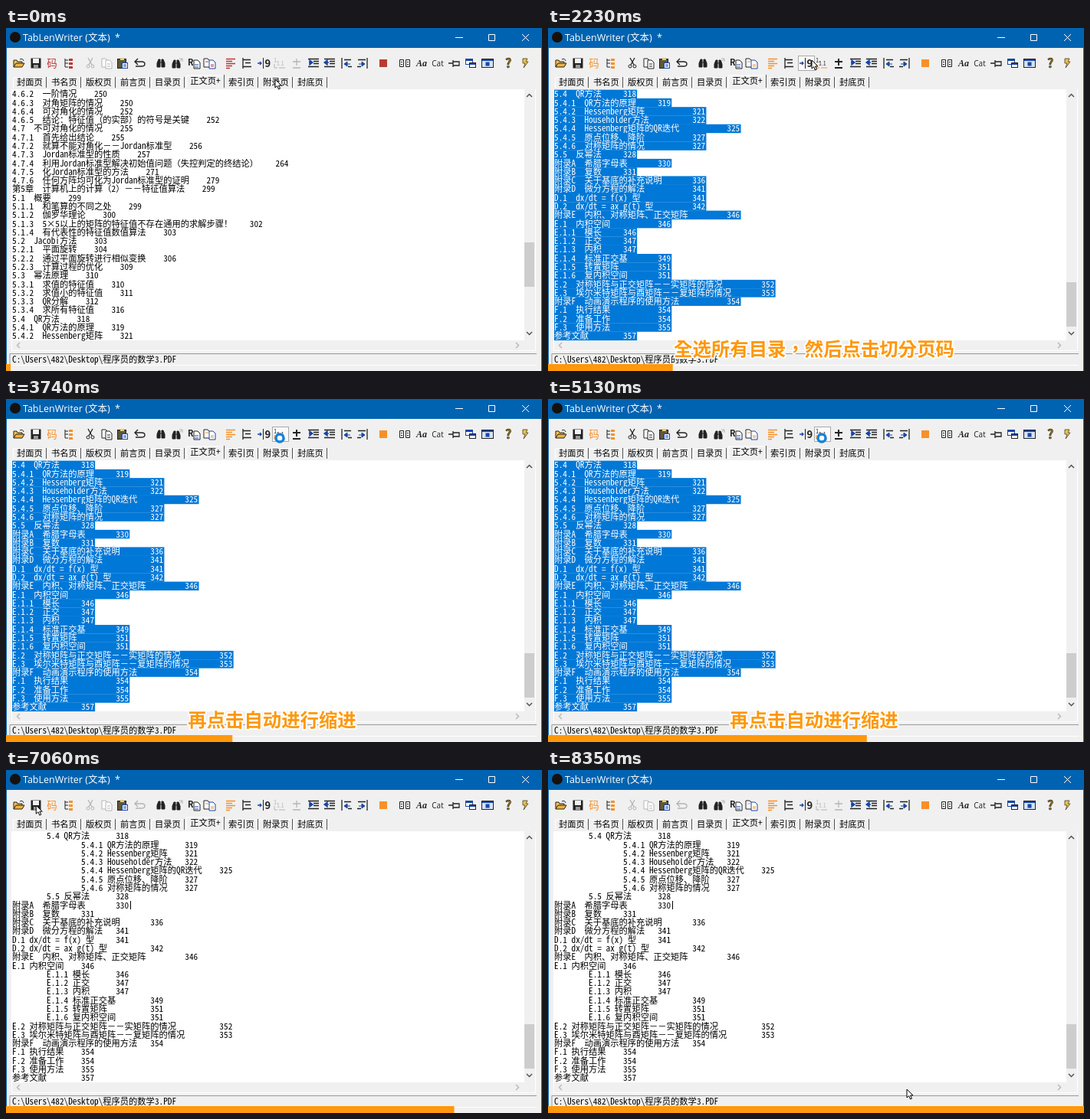
An HTML page that plays this animation: 699 by 448 pixels, repeating every 8420 ms.

```html
<!DOCTYPE html>
<html lang="zh-CN">
<head>
<meta charset="utf-8">
<style>
html, body { margin: 0; width: 100%; height: 100%; overflow: hidden; background: #f0f0f0; }
svg { display: block; }
text { white-space: pre; font-family: "Noto Sans CJK SC", sans-serif; }
.mono { font-family: "Noto Sans Mono CJK SC", "Noto Sans CJK SC", monospace; font-size: 11.28px; }
.ui { font-family: "Open Sans", "Noto Sans CJK SC", sans-serif; }
.cap { font: 700 24.4px "Noto Sans CJK TC", "Noto Sans CJK SC", sans-serif; fill: #ff980c;
  stroke: #fff; stroke-width: 4px; stroke-linejoin: round; paint-order: stroke; text-anchor: middle; }
</style>
</head>
<body>
<svg id="stage" width="699" height="448" viewBox="0 0 699 448"></svg>
<script>
const LOOP = 8420, COL = 5.64, ROW = 11.285, TOP = 80.6;
const SELECT = 1000, SPLIT = 1900, NEXT = 2800, BUSY = 3500, INDENT = 5800,
  DESELECT = 6600, DIALOG = 7200, CLOSE = 8000;
const APP = 'TabLenWriter', BLUE = '#0063b1', INK = '#222', GREY = '#b4b4b4';

// Each entry: number|title|page
const parse = s => s.trim().split('\n').map(l => l.split('|'));
const middle = parse(`
4.6.2|一阶情况|250
4.6.3|对角矩阵的情况|250
4.6.4|可对角化的情况|252
4.6.5|结论：特征值（的实部）的符号是关键|252
4.7|不可对角化的情况|255
4.7.1|首先给出结论|255
4.7.2|就算不能对角化－－Jordan标准型|256
4.7.3|Jordan标准型的性质|257
4.7.4|利用Jordan标准型解决初始值问题（失控判定的终结论）|264
4.7.5|化Jordan标准型的方法|271
4.7.6|任何方阵均可化为Jordan标准型的证明|279
第5章|计算机上的计算（2）－－特征值算法|299
5.1|概要|299
5.1.1|和笔算的不同之处|299
5.1.2|伽罗华理论|300
5.1.3|5×5以上的矩阵的特征值不存在通用的求解步骤！|302
5.1.4|有代表性的特征值数值算法|303
5.2|Jacobi方法|303
5.2.1|平面旋转|304
5.2.2|通过平面旋转进行相似变换|306
5.2.3|计算过程的优化|309
5.3|幂法原理|310
5.3.1|求值的特征值|310
5.3.2|求值小的特征值|311
5.3.3|QR分解|312
5.3.4|求所有特征值|316
5.4|QR方法|318
5.4.1|QR方法的原理|319
5.4.2|Hessenberg矩阵|321`);
const ending = parse(`
5.4|QR方法|318
5.4.1|QR方法的原理|319
5.4.2|Hessenberg矩阵|321
5.4.3|Householder方法|322
5.4.4|Hessenberg矩阵的QR迭代|325
5.4.5|原点位移、降阶|327
5.4.6|对称矩阵的情况|327
5.5|反幂法|328
附录A|希腊字母表|330
附录B|复数|331
附录C|关于基底的补充说明|336
附录D|微分方程的解法|341
D.1|dx/dt = f(x) 型|341
D.2|dx/dt = ax g(t) 型|342
附录E|内积、对称矩阵、正交矩阵|346
E.1|内积空间|346
E.1.1|模长|346
E.1.2|正交|347
E.1.3|内积|347
E.1.4|标准正交基|349
E.1.5|转置矩阵|351
E.1.6|复内积空间|351
E.2|对称矩阵与正交矩阵－－实矩阵的情况|352
E.3|埃尔米特矩阵与酉矩阵－－复矩阵的情况|353
附录F|动画演示程序的使用方法|354
F.1|执行结果|354
F.2|准备工作|354
F.3|使用方法|355
|参考文献|357`);

const cols = s => [...s].reduce((n, c) => n + (c > '~' ? 2 : 1), 0);
const tab = s => s + ' '.repeat(8 - cols(s) % 8);
const head = (n, title, sep) => (n ? n + sep : '') + title;
const plain = ([n, title, page]) => head(n, title, '  ') + '    ' + page;
const split = ([n, title, page]) => tab(head(n, title, '  ') + '    ') + page;
const indent = ([n, title, page]) => {
  const dots = n.split('.').length - 1;
  const level = /^[A-Z]/.test(n) ? dots - 1 : dots;
  return tab(' '.repeat(8 * level) + head(n, title, dots ? ' ' : '  ') + '  ') + page;
};

const rect = (x, y, w, h, fill, stroke = 'none') =>
  `<rect x="${x}" y="${y}" width="${w}" height="${h}" fill="${fill}" stroke="${stroke}"/>`;
const path = (d, stroke, w = 1, fill = 'none') =>
  `<path d="${d}" stroke="${stroke}" stroke-width="${w}" fill="${fill}"/>`;
const text = (x, y, s, size, fill = '#000', extra = '') =>
  `<text x="${x}" y="${y}" font-size="${size}" fill="${fill}" ${extra}>${s}</text>`;
const mid = 'text-anchor="middle"';
const at = (x, y, s) => `<g transform="translate(${x} ${y})">${s}</g>`;

function titleBar(dialog, dirty) {
  const fg = dialog ? '#777' : '#fff';
  return rect(0, 0, 699, 26, dialog ? '#fff' : BLUE) +
    path('M.5 26V448M698.5 26V448', dialog ? '#aaa' : BLUE) +
    '<circle cx="12" cy="12" r="7" fill="#15110f"/>' +
    text(22, 17, `${APP} (文本)${dirty ? '  *' : ''}`, 12.5, fg, 'class="ui"') +
    path('M586 12.5h10M629.5 8.5h8v8h-8zM673 8l9 9m0-9l-9 9', fg);
}

const binoculars = c => path('M-5 5V0l2-5h2v10zM5 5V0l-2-5h-2v10zM-1-1h2', c, 1, c);
const page = (x, c) => path(`M${x} -6h5l3 3v8h-8z`, c, 1, '#fff');
const shift = (dir, c) => path('M-7-5.5H7M0-2.5h7M0 .5h7M-7 4.5H7', INK, 1.5) +
  path(`M${dir < 0 ? -7 : -1}-1l${-dir * 4}-3v6zM-6-1h5`, c, 1.4, c);

function toolbar(selected, undo, hot) {
  const edit = selected ? INK : GREY, blue = '#1747a8';
  const icons = [
    [17, path('M-7 5V-4h4l1 2h6v2', INK, 1, '#f6c35a') + path('M-7 5l3-5H7L4 5z', INK, 1, '#eeb23e') + path('M1-5q4-2 5 2', INK)],
    [39, rect(-6.5, -6.5, 13, 13, '#222') + rect(-4, -6, 8, 6, '#f0f0f0') + rect(-3, 2, 6, 4, '#999')],
    [60, text(0, 5, '码', 13.5, hot, mid)],
    [82, path('M-5-6V5h4M-5 0h4M-5-4h4', INK) + rect(0, -6, 5, 3, hot) + rect(0, -1, 5, 3, hot) + rect(0, 4, 5, 3, hot)],
    [110, path('M-3-7L2 2M3-7L-2 2', edit, 1.3) + `<circle cx="-3" cy="4" r="2" fill="none" stroke="${edit}"/><circle cx="3" cy="4" r="2" fill="none" stroke="${edit}"/>`],
    [131, page(-6, edit) + at(5, 2, page(-6, edit)) + path('M1 1h4M1 4h4', edit)],
    [152, rect(-6.5, -5.5, 11, 12, '#5f563c', INK) + rect(-3, -7, 5, 3, '#e6cf72') + rect(-.5, -.5, 7, 7, '#fff', blue) + path('M1 2h4M1 4h4', blue)],
    [174, path('M-6-2h9q4 0 4 3t-4 3h-8M-2-6l-4 4l4 4', undo ? INK : GREY, 1.4)],
    [202, binoculars(INK)],
    [223, at(-1, 1, binoculars(INK)) + path('M3-6h4v4M7-6l-4 4', GREY)],
    [244, text(-7, 3, 'R', 11, INK, 'font-weight="700"') + at(2, 2, page(-1, INK)) + path('M2 2h5M2 5h5', blue)],
    [265, page(-7, INK) + at(5, 2, page(-5, blue)) + path('M-5-2h4M2 2h4M2 4h4', hot)],
    [293, path('M-6-5.5H6M-6-2.5H2M-6 .5H6M-6 3.5H2M-6 6.5H-1', hot, 1.6)],
    [314, path('M-5-7V7M-5-4.5H5M-2-.5H5M-5 4.5H6', INK, 1.3)],
    [336, path('M-8 0h5M-5-2l2 2l-2 2', blue, 1.3) + path('M-.5-7V7', INK) + text(1.5, 5, '9', 13, INK, 'font-weight="700"')],
    [357, text(-8, -1, '1.', 7.5, edit) + text(-4, 3, '1.1', 7, edit) + path('M-1 6H7M-7 1v5h4', selected ? hot : GREY)],
    [379, path('M-5-2H5M0-6V3M-5 6H5', edit, selected ? 2 : 1.3)],
    [401, shift(1, blue)],
    [422, shift(-1, blue)],
    [444, path('M-6-7V7M-3-4.5H6M2 4.5H7', INK, 1.3) + path('M-2 1H5M1-2l-4 3l4 3z', blue, 1, blue)],
    [465, path('M6-7V7M-6-4.5H4M-7 4.5H-2', INK, 1.3) + path('M-5 1H2M-1-2l4 3l-4 3z', blue, 1, blue)],
    [492, rect(-5, -5, 10, 10, hot)],
    [520, path('M-6.5-4.5h5v9h-5zM1.5-4.5h5v9h-5zM-5-1.5h2M-5 1.5h2M3-1.5h2M3 1.5h2', INK)],
    [542, text(0, 4, 'Aa', 12, INK, mid + ' style="font:italic 700 12px Liberation Serif,serif"')],
    [563, text(0, 4, 'Cat', 10, INK, mid + ' class="ui"')],
    [585, path('M-8 0h6M-2-4V5M-2-2H6V3H-2', INK, 1.3)],
    [606, rect(-6.5, -5.5, 9, 7, '#fff', blue) + rect(-6, -5, 8, 2, blue) + rect(-1.5, -.5, 8, 6, '#fff', INK) + rect(-1, 0, 7, 2, blue)],
    [628, rect(-7.5, -5.5, 15, 11, '#d6e2f5', INK) + rect(-7, -5, 14, 2, blue) + rect(-2.5, -1.5, 5, 5, blue)],
    [655, text(0, 6, '?', 16, '#9b7610', mid + ' font-weight="700" stroke="#222" stroke-width=".6"')],
    [677, path('M-3-6h6l-2 4h3l-6 8l2-6h-3z', '#665a30', 1, '#efc44c')]
  ];
  return icons.map(([x, s]) => at(x, 46, s)).join('');
}

function tabs() {
  const names = ['封面页', '书名页', '版权页', '前言页', '目录页', '正文页+', '索引页', '附录页', '封底页'];
  const centers = [31, 76, 121, 166, 211, 260, 307, 352, 397];
  return names.map((s, i) => {
    const on = i === 5, half = on ? 25 : 22, x = centers[i];
    return path(`M${x - half + .5} 78V${on ? 62 : 65}h${2 * half - 2}`, '#fff') +
      path(`M${x + half - .5} 78V${on ? 61 : 64}`, '#555') +
      text(x, on ? 73 : 75, s, 11.28, '#000', mid + ' class="mono"');
  }).join('');
}

function frame(thumb) {
  return rect(7, 80, 684, 342, '#fff') +
    rect(676, 80, 14, 341, '#f0f0f0') + rect(8, 408, 682, 13, '#f0f0f0') +
    rect(676, thumb, 13, 58, '#cdcdcd') +
    path('M679 90l3.5-3.5l3.5 3.5M679 397l3.5 3.5l3.5-3.5', '#555', 1.5) +
    path('M18 411l-3.5 3.5l3.5 3.5M665 411l3.5 3.5l-3.5 3.5', '#bbb', 1.5) +
    path('M5 440V425.5H692', '#999') + path('M5 440.5H692', '#fff') +
    text(8, 437, 'C:\\Users\\482\\Desktop\\程序员的数学3.PDF', 11.28, '#000', 'class="mono"');
}

const lines = (list, selected) => list.map((s, i) => {
  const y = TOP + i * ROW;
  return (selected ? rect(8, y, cols(s) * COL + 1, ROW + .2, '#0078d7') : '') +
    text(8, y + 9.7, s, 11.28, selected ? '#fff' : '#000', 'class="mono"');
}).join('');

function dialogBox() {
  return rect(239, 151, 227, 157, '#0002') + rect(235.5, 147.5, 227, 157, '#fff', BLUE) +
    rect(235, 147, 228, 26, BLUE) +
    text(239, 165, `${APP} (PDF书签编辑工具)`, 12.2, '#fff', 'class="ui"') +
    path('M441 157l8 8m0-8l-8 8', '#fff') +
    path('M278 204L295 233H261z', '#d08b18', 3, '#ffbf35') +
    path('M278 213v10', '#222', 4) + '<circle cx="278" cy="228" r="2.3" fill="#222"/>' +
    text(297, 217.5, '存储完毕。', 10, '#000') +
    rect(359, 266, 82, 26, '#fff') + path('M359.5 292V266.5H441', '#aaa') +
    path('M359 291.5H440.5V266', '#333', 2) +
    text(400, 283, '确定', 10.5, '#000', mid);
}

const track = [
  [0, 351, 67], [1000, 351, 67], [1700, 344, 42], [2900, 344, 42], [3400, 357, 51],
  [5800, 357, 51], [6250, 302, 178], [6450, 302, 178], [6580, 162, 176], [6700, 162, 176],
  [7050, 39, 46], [7750, 400, 279], [8000, 400, 279], [8250, 468, 417], [LOOP, 468, 417]
];
function cursor(t) {
  if (t > DIALOG && t < 7750) return '';
  const i = track.findIndex(k => k[0] > t);
  const [t0, x0, y0] = track[i - 1], [t1, x1, y1] = track[i];
  const u = (t - t0) / (t1 - t0), e = u * u * (3 - 2 * u);
  const x = x0 + (x1 - x0) * e, y = y0 + (y1 - y0) * e;
  if (t >= BUSY && t < INDENT)
    return `<circle cx="${x}" cy="${y}" r="5" fill="#fff" stroke="#1683d8" stroke-width="3.5"/>`;
  const overText = y > 80 && y < 407 && x > 8 && x < 676 && t < DIALOG;
  return at(x, y, overText
    ? path('M-3-5.5h2.5h3M-3 5.5h2.5h3M0-5V5', '#222')
    : path('M0 0V11L2.7 8.6L4.6 13L6.5 12L4.6 8H8z', '#000', 1, '#fff'));
}

function draw(t) {
  const dialog = t >= DIALOG && t < CLOSE;
  const selected = t >= SELECT && t < DESELECT;
  const list = t < SELECT ? middle.map(plain)
    : ending.map(t < SPLIT ? plain : t < INDENT ? split : indent);
  const caption = t < 700 ? '' : t < NEXT ? '全选所有目录，然后点击切分页码'
    : t < 6900 ? '再点击自动进行缩进' : '';
  const step = t < 500 ? 0 : 1 + Math.floor((t - 500) / 68.94 + .15);
  const pressed = t > 1700 && t < NEXT ? 326 : t > 3400 && t < INDENT ? 347 : 0;
  return rect(0, 0, 699, 448, '#f0f0f0') + titleBar(dialog, t < CLOSE) +
    (pressed ? rect(pressed + .5, 36.5, 21, 19, '#fafafa', '#aaa') : '') +
    toolbar(selected, t < INDENT, t < SELECT ? '#b93a35' : '#f7902a') +
    tabs() + frame(t < SELECT ? 280 : 332) + lines(list, selected) +
    (t >= DESELECT && !dialog ? path('M162.5 171v11', '#000') : '') +
    (dialog ? dialogBox() : '') +
    rect(0, 439, 699 * (step + 1) / 116, 9, '#ff980c') +
    (caption && `<text class="cap" lang="zh-TW" x="347" y="428">${caption}</text>`) + cursor(t);
}

const stage = document.getElementById('stage');
const start = performance.now();
let last = '';
function tick() {
  const html = draw((performance.now() - start) % LOOP);
  if (html !== last) stage.innerHTML = last = html;
  requestAnimationFrame(tick);
}
tick();
</script>
</body>
</html>
```
